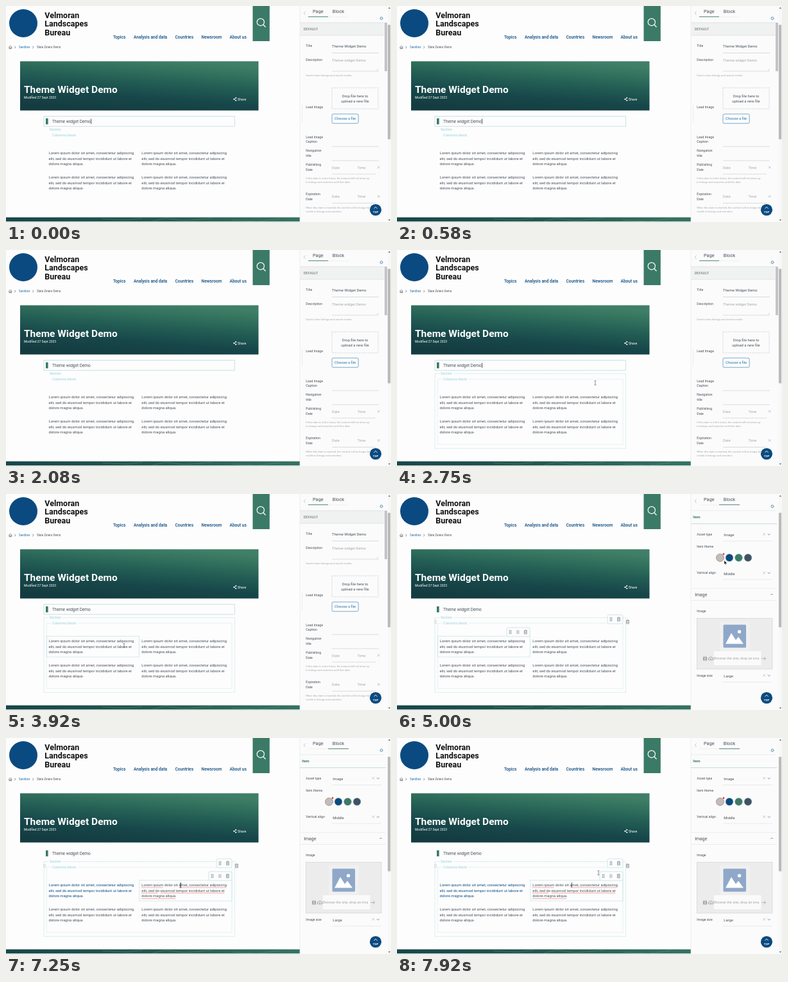
An HTML page for the animation above (8000 ms loop, 600 by 338 pixels).

```html
<!DOCTYPE html>
<html lang="en">
<head>
<meta charset="utf-8">
<title>Theme Widget Demo</title>
<style>
  html, body { margin: 0; width: 100%; height: 100%; overflow: hidden; background: #fdfdfd; }
  svg { display: block; width: 100vw; height: 100vh; font-family: Roboto, Arial, sans-serif; }
</style>
</head>
<body>
<svg id="stage" viewBox="0 0 600 338"></svg>
<script>
const LOOP = 8000;
const NAVY = '#0a4a80', GREEN = '#3b7a66', INK = '#474f59', ICON = '#666d74';
const PALE = '#b7dde0', LABEL = '#93d0d8', LINE = '#c9cdd1', FAINT = '#e0e3e5', HINT = '#a3a6aa';

const text = (x, y, s, size, fill = INK, weight = 400, extra = '') =>
  `<text x="${x}" y="${y + size * 0.35}" font-size="${size}" fill="${fill}" font-weight="${weight}" ${extra}>${s}</text>`;
const rect = (x, y, w, h, fill = 'none', extra = '') =>
  `<rect x="${x}" y="${y}" width="${w}" height="${h}" fill="${fill}" ${extra}/>`;
const circle = (x, y, r, fill, extra = '') =>
  `<circle cx="${x}" cy="${y}" r="${r}" fill="${fill}" ${extra}/>`;
const path = (d, stroke = INK, width = 0.6, extra = '') =>
  `<path d="${d}" fill="none" stroke="${stroke}" stroke-width="${width}" ${extra}/>`;
const outline = (x, y, w, h, stroke = PALE, extra = '') =>
  rect(x, y, w, h, 'none', `stroke="${stroke}" stroke-width=".6" ${extra}`);
const group = (id, body) => `<g id="${id}">${body}</g>`;
const rule = (y, x1 = 508, x2 = 581, stroke = LINE) => path(`M${x1} ${y}H${x2}`, stroke, 0.7);
const cross = (x, y, stroke = '#9aa0a6') => path(`M${x - 1.8} ${y - 1.8}l3.6 3.6m0-3.6l-3.6 3.6`, stroke, 0.6);

// Small toolbar icons
const dots = (x, y, fill = ICON) => [-2.2, 0, 2.2].map(d =>
  circle(x - 1.1, y + d, 0.7, fill) + circle(x + 1.1, y + d, 0.7, fill)).join('');
const trash = (x, y) => path(`M${x - 2.5} ${y - 2}h5M${x - 1} ${y - 2}v-1h2v1M${x - 1.9} ${y - 2}v5h3.8v-5M${x - .6} ${y - .6}v2.4m1.2-2.4v2.4`, ICON, 0.6);
const list = (x, y) => path(`M${x - 2.4} ${y - 2.2}h4.8m-4.8 1.5h4.8m-4.8 1.5h4.8m-4.8 1.5h4.8`, '#8b9197', 0.6);
const toolbar = (x, y, w) => rect(x, y, w, 14, '#fdfdfd', `rx="2.5" stroke="${PALE}" stroke-width=".7"`);

const LOREM = ['Lorem ipsum dolor sit amet, consectetur adipiscing',
  'elit, sed do eiusmod tempor incididunt ut labore et', 'dolore magna aliqua.'];
const lorem = (x, y, fill = INK) => LOREM.map((s, i) => text(x, y + i * 8.7, s, 5.83, fill)).join('');

const defs = `<defs>
  <linearGradient id="sea" x1=".32" y1="1" x2=".68" y2="0">
    <stop offset="0" stop-color="#143c40"/><stop offset=".3" stop-color="#17474a"/>
    <stop offset=".6" stop-color="#245f55"/><stop offset=".85" stop-color="#35755f"/>
    <stop offset="1" stop-color="#3f7f68"/></linearGradient>
  <linearGradient id="footer"><stop offset="0" stop-color="#174649"/><stop offset=".5" stop-color="#23594f"/>
    <stop offset="1" stop-color="#357362"/></linearGradient></defs>`;

const header = circle(27, 27, 22, NAVY) +
  ['Velmoran', 'Landscapes', 'Bureau'].map((s, i) => text(60.3, 14.2 + i * 13.6, s, 12.5, '#111', 700)).join('') +
  [[167, 'Topics'], [199, 'Analysis and data'], [263.5, 'Countries'], [304.5, 'Newsroom'], [348.5, 'About us']]
    .map(([x, s]) => text(x, 48.3, s, 6.6, NAVY, 500)).join('') +
  rect(384.5, 0, 26.3, 55, GREEN) +
  circle(396.8, 25.2, 5.6, 'none', 'stroke="#fff" stroke-width="1.2"') + path('M400.8 29.2l3.7 3.8', '#fff', 1.3) +
  path('M4.2 64.5l2.6-2.3 2.6 2.3M5 64v3h1.2v-1.8h1.2V67h1.2v-3', INK, 0.6) +
  path('M13.3 62.8l1.7 1.7-1.7 1.7M41.3 62.8l1.7 1.7-1.7 1.7', INK, 0.7) +
  text(20, 64.5, 'Sandbox', 4.5, '#1b6db0') + text(48, 64.5, 'Slate Zotero Demo', 4.5);

const hero = rect(22, 86.5, 371.5, 77, 'url(#sea)') +
  text(28, 130.7, 'Theme Widget Demo', 15.5, '#fff', 700) +
  text(28, 143.3, 'Modified 27 Sept 2023', 5, '#fff') +
  path('M358.3 143.8l-3 2 3 2', '#fff', 0.7) +
  [[358.3, 143.8], [355.3, 145.8], [358.3, 147.8]].map(([x, y]) => circle(x, y, 1, '#fff')).join('') +
  text(360.8, 146, 'Share', 5.3, '#fff');

const footer = rect(0, 330.7, 458, 6.5, 'url(#footer)') +
  path('M150 333l38 2 25-3m15 5l20-5 30 4 44-4m30 3l40 2 35-4', '#79a598', 0.5, 'opacity=".6"');

const underlines = [[211, 245, 234], [270, 343, 234], [211, 236, 242.7], [241, 340, 242.7], [211, 264, 251.4]]
  .map(([a, b, y]) => path(`M${a} ${y}H${b}`, '#e0534f', 0.7, 'stroke-dasharray="1.4 .6"')).join('');

const editor =
  group('titleBox', outline(59, 172.7, 297.5, 15.5, '#a8cfd4')) +
  rect(62, 175.8, 3.6, 9.4, GREEN) + text(72, 180.5, 'Theme widget Demo', 6.5) +
  group('titleCaret', path('M132.6 176.5v8', '#111', 0.7)) +
  group('frames', outline(59, 193.5, 297.5, 117, PALE, 'stroke-dasharray="2 .7"') +
    outline(63.3, 202.3, 288.7, 102, PALE, 'stroke-dasharray="1.2 .9"')) +
  rect(66.5, 190, 22, 7, '#fdfdfd') + text(68, 193.5, 'Section', 5.3, LABEL) +
  rect(70.5, 199, 41, 7, '#fdfdfd') + text(72, 202.3, 'Columns block', 5.6, LABEL) +
  group('leftText', lorem(66.5, 230, 'currentColor')) + lorem(211.3, 230) + lorem(66.5, 267.8) + lorem(211.3, 267.8) +
  group('leftBox', outline(63.3, 222.5, 144, 32.5)) +
  group('rightBox', outline(208, 222.5, 144, 32.5) + underlines) +
  group('sectionTools', toolbar(328, 189, 24) + dots(333.5, 196) + trash(345.5, 196) + dots(60, 200, '#c4c8cb') + trash(359.5, 200)) +
  group('blockTools', toolbar(171, 209, 36) + dots(176.5, 216) + list(188.3, 216) + trash(200.3, 216)) +
  group('rightCaret', path('M272.3 226v8', '#111', 0.7));

const panelFrame = rect(458, 0, 136.5, 338, '#fbfbfb') + path('M458 0V338', '#e4e6e8', 0.6) +
  path('M466.5 8.5l-2.3 2.7 2.3 2.7', '#9aa0a6', 0.6) + path('M471 17h63', FAINT, 0.5) +
  text(478, 8.3, 'Page', 7.4) + text(508.8, 8.3, 'Block', 7.4) +
  circle(585, 19.3, 1.7, 'none', 'stroke="#5b8fb0" stroke-width=".8"') +
  circle(585, 19.3, 2.4, 'none', 'stroke="#5b8fb0" stroke-width=".7" stroke-dasharray="1 1"');

const label = (y, ...lines) => lines.map((s, i) => text(467.3, y + i * 7.4, s, 5.1)).join('');
const help = (y, ...lines) => lines.map((s, i) => text(467.3, y + i * 5.6, s, 4.1, HINT)).join('');
const dateField = y => text(508, y, 'Date', 5.7, HINT) + text(547.5, y, 'Time', 5.7, HINT) + cross(580.7, y - 0.5) + rule(y + 10, 508, 576);
const centered = (y, s) => text(544, y, s, 5.8, INK, 400, 'text-anchor="middle"');
const tabLine = (x1, x2) => path(`M${x1} 16.8H${x2}`, GREEN, 0.9);

const pagePanel = tabLine(471, 502) +
  rect(458, 26, 131.5, 20, '#f0f1f1') + path('M458 26h131.5M458 46h131.5', '#d5d9db', 0.6) +
  text(463.7, 36.3, 'DEFAULT', 5.6, '#5f666d') +
  label(62.5, 'Title') + text(508, 63, 'Theme Widget Demo', 5.76) + rule(73.5) +
  label(84.5, 'Description') + text(508, 84.5, 'Theme widget Demo', 5.76, HINT) + rule(102) +
  path('M578 100.5l2-2m-.8 2l.8-.8', '#999', 0.4) +
  help(109, 'Used in item listings and search results') +
  label(158.7, 'Lead Image') + path('M461.5 155v27', '#e4e6e8', 0.6) +
  outline(508, 128, 72, 33, '#b9c3c8', 'stroke-dasharray="2.5 1.2"') +
  centered(140.5, 'Drop file here to') + centered(149.3, 'upload a new file') +
  outline(508, 169, 41.2, 14.7, '#2576ae', 'rx="2"') + text(512, 176.3, 'Choose a file', 5.75, '#2576ae') +
  label(204.8, 'Lead Image', 'Caption') + rule(220) +
  label(226.7, 'Navigation', 'title') + rule(242) +
  label(248.5, 'Publishing', 'Date') + dateField(253) +
  help(270, 'If this date is in the future, the content will not show up', 'in listings and searches until this date.') +
  label(294.5, 'Expiration', 'Date') + dateField(298.5) +
  help(316, 'When this date is reached, the content will no longer be', 'visible in listings and searches.') +
  rect(590, 26, 4, 76, '#c2c4c6');

const select = (y, name, value) => label(y, name) + text(509.3, y + 1, value, 5.76) + cross(572.3, y - 0.3, '#c99a9a') +
  path(`M577.7 ${y - 1}l2.1 2 2.1-2`, '#2576ae', 0.7) + rule(y + 10.3, 508, 585, FAINT);
const swatchX = [503.5, 518, 532.5, 547];

const blockPanel = tabLine(502, 534) +
  text(461.3, 36.3, 'Item', 5.6, GREEN, 700) + path('M458 26h131.5', FAINT, 0.6) + path('M458 46.5h134', '#a3c5bc', 0.6) +
  select(63.2, 'Asset type', 'Image') + label(82, 'Item theme') +
  ['#dededf', NAVY, GREEN, '#3d5265'].map((c, i) => circle(swatchX[i], 99.7, 6, c, `id="swatch${i}" stroke="#c5c9cc" stroke-width=".6"`)).join('') +
  circle(509, 94, 1.4, '#e0392f', 'id="badge"') +
  select(123.5, 'Vertical align', 'Middle') +
  path('M458 147.8h134M458 166.5h134', FAINT, 0.6) + text(464.2, 157.2, 'Image', 6.9) +
  path('M582.4 157.8l1.6-1.6 1.6 1.6', INK, 0.7) + label(182.8, 'Image') +
  rect(467.5, 194.5, 117.5, 79.5, '#ececec', `stroke="${LINE}" stroke-width=".6"`) +
  rect(503, 199, 47, 47, '#f0f0f0') + rect(508.5, 204.5, 35.5, 36, '#8fa8c9', 'rx="1.5"') +
  circle(533.5, 215.5, 2.7, '#fff') +
  '<path d="M512 234.5l9-17 7 11 4-5 8 11z" fill="#fff"/>' +
  rect(494, 246, 73.5, 22, '#fafafa') + text(494, 257.5, 'Browse the site, drop an ima', 5.6, HINT) +
  path('M477.5 255h5v5.2h-5zm0 1.7h5m-5 1.7h5', ICON, 0.6) +
  path('M487.4 260h-.3a1.8 1.8 0 0 1 0-3.6a2.1 2.1 0 0 1 4 0a1.8 1.8 0 0 1 0 3.6h-.3M489.1 261v-3.2m-1.1 1.1l1.1-1.1 1.1 1.1', ICON, 0.6) +
  path('M568 257.5h6.5m-2.6-2.6l2.6 2.6-2.6 2.6', '#8b9095', 0.6) +
  select(284, 'Image size', 'Large');

const chrome = rect(594.5, 0, 5.5, 338, '#f8f8f8') + rect(594.9, 29.5, 4.2, 179, '#bababa') +
  '<path d="M595.8 4l1.6-2 1.6 2zM595.8 334l1.6 2 1.6-2z" fill="#555"/>' +
  circle(576, 319, 9.1, NAVY) + path('M573.3 317l2.7-2.6 2.7 2.6', '#fff', 0.9) +
  text(576, 322.5, 'TOP', 4.3, '#fff', 700, 'text-anchor="middle"');

const pointers = group('pointer',
  group('beam', path('M-1.5-3.2h1.1l.4.4.4-.4h1.1M0-3v6M-1.5 3.2h1.1l.4-.4.4.4h1.1', '#444', 0.6)) +
  group('arrow', '<path d="M0-2v6l1.4-1.3.9 2.1.9-.4-.9-2h1.9z" fill="#111" stroke="#fff" stroke-width=".3"/>') +
  group('hand', '<path d="M-.6-3q.8-.7 1.4 0V0l2.6.7v2.2L2.6 4.7h-2.8L-2 1.8l.7-.6.7.7z" fill="#fff" stroke="#111" stroke-width=".5"/>'));

document.getElementById('stage').innerHTML = defs + rect(0, 0, 600, 338, '#fdfdfd') +
  header + hero + footer + editor + panelFrame + group('pagePanel', pagePanel) + group('blockPanel', blockPanel) + chrome + pointers;

const el = id => document.getElementById(id);
const show = (id, on) => el(id).setAttribute('visibility', on ? 'visible' : 'hidden');

// Pointer stops: time, x, y
const stops = [[2520, 400, 188], [2720, 309, 208], [3540, 309, 208], [3880, 184, 237], [4420, 184, 237],
  [4940, 510, 106], [5250, 510, 106], [5500, 519.5, 100.5], [6080, 519.5, 100.5], [6420, 272, 231],
  [7420, 272, 231], [7850, 314, 211], [LOOP, 314, 211]];
const ENTER = 2520, SELECT_LEFT = 4150, PICK_THEME = 5600, SELECT_RIGHT = 6670;

function pointerAt(t) {
  const i = Math.max(1, stops.findIndex(s => s[0] >= t));
  const [t0, x0, y0] = stops[i - 1], [t1, x1, y1] = stops[i];
  const p = Math.min(1, Math.max(0, (t - t0) / (t1 - t0)));
  const k = p * p * (3 - 2 * p);
  return [x0 + (x1 - x0) * k, y0 + (y1 - y0) * k];
}

function update(t) {
  const block = t >= SELECT_LEFT, right = t >= SELECT_RIGHT, themed = t >= PICK_THEME;
  const [x, y] = pointerAt(t);
  const overSwatch = y < 110 && x > 514 && x < 525, inPanel = x > 458;

  show('pagePanel', !block);
  show('blockPanel', block);
  show('titleBox', !block);
  show('titleCaret', t < 3850 && t % 1200 < 600);
  show('frames', t >= ENTER);
  show('leftBox', !right && (block || (t > 3540 && x < 207)));
  show('rightBox', right);
  show('sectionTools', block);
  show('blockTools', block);
  el('blockTools').setAttribute('transform', `translate(${right ? 145 : 0} 0)`);
  show('rightCaret', right && (t - SELECT_RIGHT) % 1200 < 600);
  el('leftText').setAttribute('color', themed ? NAVY : INK);

  const picked = themed && !right ? 1 : 0;
  el('swatch0').setAttribute('fill', picked ? '#dededf' : '#bfbdbd');
  el('swatch1').setAttribute('fill', picked ? '#123a5c' : NAVY);
  el('swatch0').setAttribute('stroke', picked ? '#c5c9cc' : '#a0625a');
  el('swatch1').setAttribute('stroke', picked ? '#4a4f55' : '#c5c9cc');
  el('badge').setAttribute('cx', swatchX[picked] + 5.5);

  el('pointer').setAttribute('transform', `translate(${x} ${y})`);
  show('beam', t >= ENTER && !inPanel);
  show('arrow', inPanel && !overSwatch);
  show('hand', overSwatch);
}

const start = performance.now();
function tick() {
  update((performance.now() - start) % LOOP);
  requestAnimationFrame(tick);
}
tick();
</script>
</body>
</html>
```
